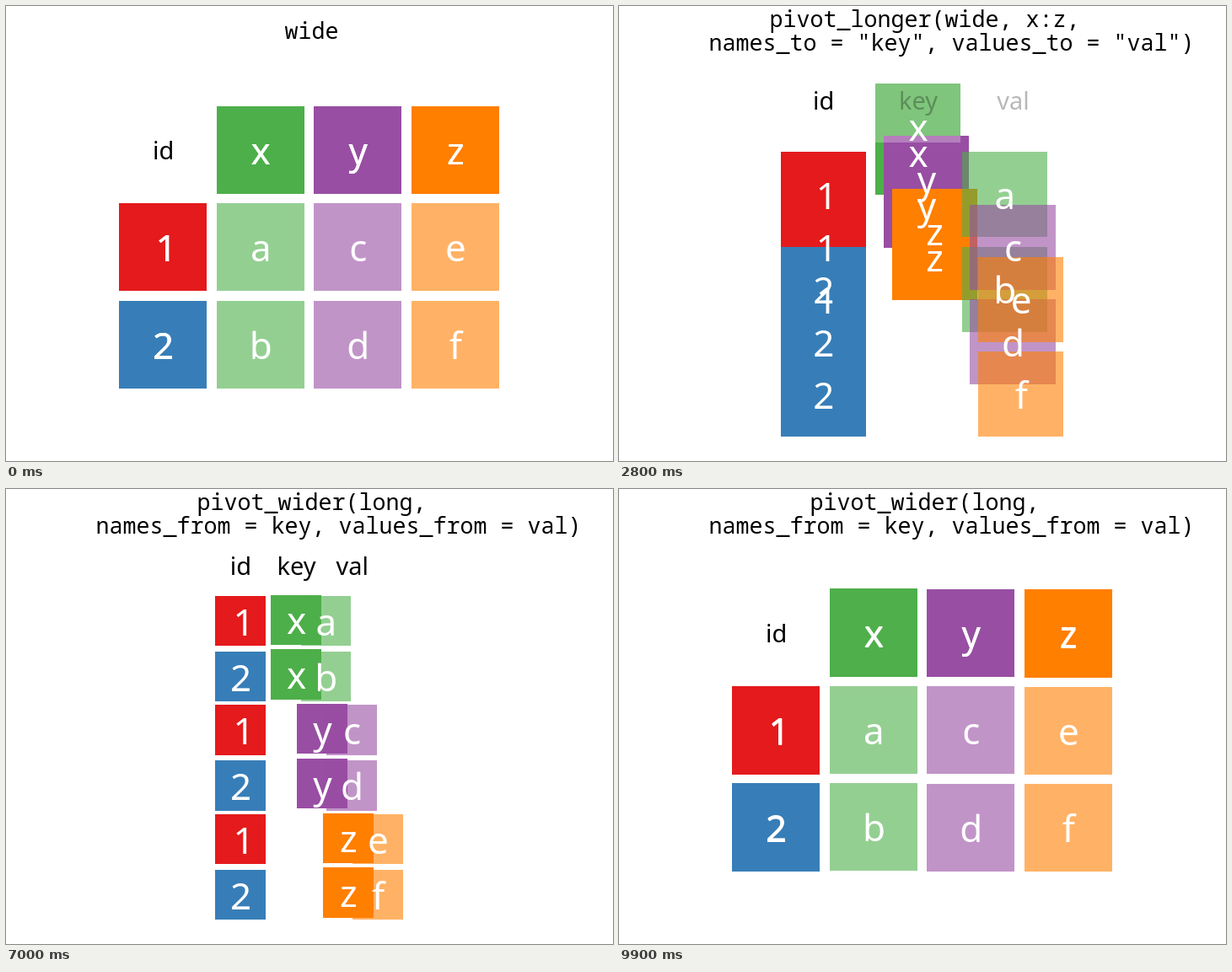
An HTML page with a canvas for the animation above (10000 ms loop, 720 by 540 pixels).

```html
<!DOCTYPE html>
<html lang="en">
<head>
<meta charset="utf-8">
<title>Wide to long and back</title>
<style>
  html, body { margin: 0; width: 100%; height: 100%; overflow: hidden; background: #fff; }
  canvas { display: block; }
</style>
</head>
<body>
<canvas id="stage" width="720" height="540"></canvas>
<script>
const ctx = document.getElementById('stage').getContext('2d');
const STEP = 100, STEPS = 100;
const CENTER_X = 359.5, CENTER_Y = 286.1, SPAN = 450.6, TILE = 0.9;
const RED = '#e41a1c', BLUE = '#377eb8', GREEN = '#4daf4a', PURPLE = '#984ea3', ORANGE = '#ff7f00';
const TITLES = {
  wide: ['wide'],
  longer: ['pivot_longer(wide, x:z,', '    names_to = "key", values_to = "val")'],
  long: ['long'],
  wider: ['pivot_wider(long,', '    names_from = key, values_from = val)']
};

// Grid cells are [column, row]; every item has one in each layout.
const items = [];
const add = (label, color, wide, long, more) => items.push({ label, color, wide, long, ...more });

for (const id of [1, 2])
  for (let k = 0; k < 3; k++) add(String(id), id === 1 ? RED : BLUE, [0, id], [0, id + 2 * k]);

const keys = [['x', GREEN], ['y', PURPLE], ['z', ORANGE]];
keys.forEach(([key, color], k) => {
  for (const id of [1, 2]) add(key, color, [k + 1, 0], [1, id + 2 * k]);
});
keys.forEach(([, color], k) => {
  for (const id of [1, 2])
    add('abcdef'[2 * k + id - 1], color, [k + 1, id], [2, id + 2 * k], { alpha: 0.6 });
});
['id', 'key', 'val'].forEach((name, col) =>
  add(name, '#fff', [col, 0], [col, 0], { header: true, fades: col > 0 }));

const sineInOut = p => (1 - Math.cos(Math.PI * p)) / 2;
const expOut = p => p === 1 ? 1 : 1 - 2 ** (-10 * p);
const mix = (a, b, e) => a + (b - a) * e;

// Columns ease out quickly while rows and opacity follow a sine.
function poseAt(step) {
  if (step < 17) return { title: 'wide', ex: 0, ey: 0 };
  if (step < 51) {
    const p = (step - 16) / 34;
    return { title: 'longer', ex: expOut(p), ey: sineInOut(p) };
  }
  if (step < 68) return { title: 'long', ex: 1, ey: 1 };
  const p = (step - 67) / 33;
  return { title: 'wider', ex: 1 - expOut(p), ey: 1 - sineInOut(p) };
}

function drawTitle(lines) {
  ctx.font = '26.67px "Noto Sans Mono", monospace';
  ctx.fillStyle = '#000';
  ctx.textAlign = 'left';
  lines.forEach((line, i) =>
    ctx.fillText(line, 362.5 - ctx.measureText(line).width / 2,
      39 + 28.8 * (i - (lines.length - 1) / 2)));
}

function draw(step) {
  const { title, ex, ey } = poseAt(step);
  const placed = items.map(it => ({
    ...it,
    col: mix(it.wide[0], it.long[0], ex),
    row: mix(it.wide[1], it.long[1], ey),
    fade: it.fades ? ey : 1
  }));

  // The view always fits the current extent of the tiles.
  const maxCol = Math.max(...placed.map(it => it.col));
  const maxRow = Math.max(...placed.map(it => it.row));
  const unit = SPAN / (Math.max(maxCol, maxRow) + TILE);
  const half = unit * TILE / 2;

  ctx.globalAlpha = 1;
  ctx.fillStyle = '#fff';
  ctx.fillRect(0, 0, 720, 540);
  drawTitle(TITLES[title]);

  for (const it of placed) {
    it.x = CENTER_X + (it.col - maxCol / 2) * unit;
    it.y = CENTER_Y + (it.row - maxRow / 2) * unit;
    const left = Math.round(it.x - half), top = Math.round(it.y - half);
    ctx.globalAlpha = (it.alpha || 1) * it.fade;
    ctx.fillStyle = it.color;
    ctx.fillRect(left, top, Math.round(it.x + half) - left, Math.round(it.y + half) - top);
  }

  ctx.textAlign = 'center';
  for (const it of placed) {
    ctx.globalAlpha = it.fade;
    ctx.fillStyle = it.header ? '#000' : '#fff';
    ctx.font = `${it.header ? 29 : 44}px "Noto Sans", sans-serif`;
    const nudge = it.label === '1' ? 4 : 0.5;
    ctx.fillText(it.label, it.x + nudge, it.y + (it.header ? 11.5 : 17));
  }
}

const start = performance.now();
function tick() {
  draw(Math.floor((performance.now() - start) / STEP) % STEPS);
  requestAnimationFrame(tick);
}
tick();
</script>
</body>
</html>
```
